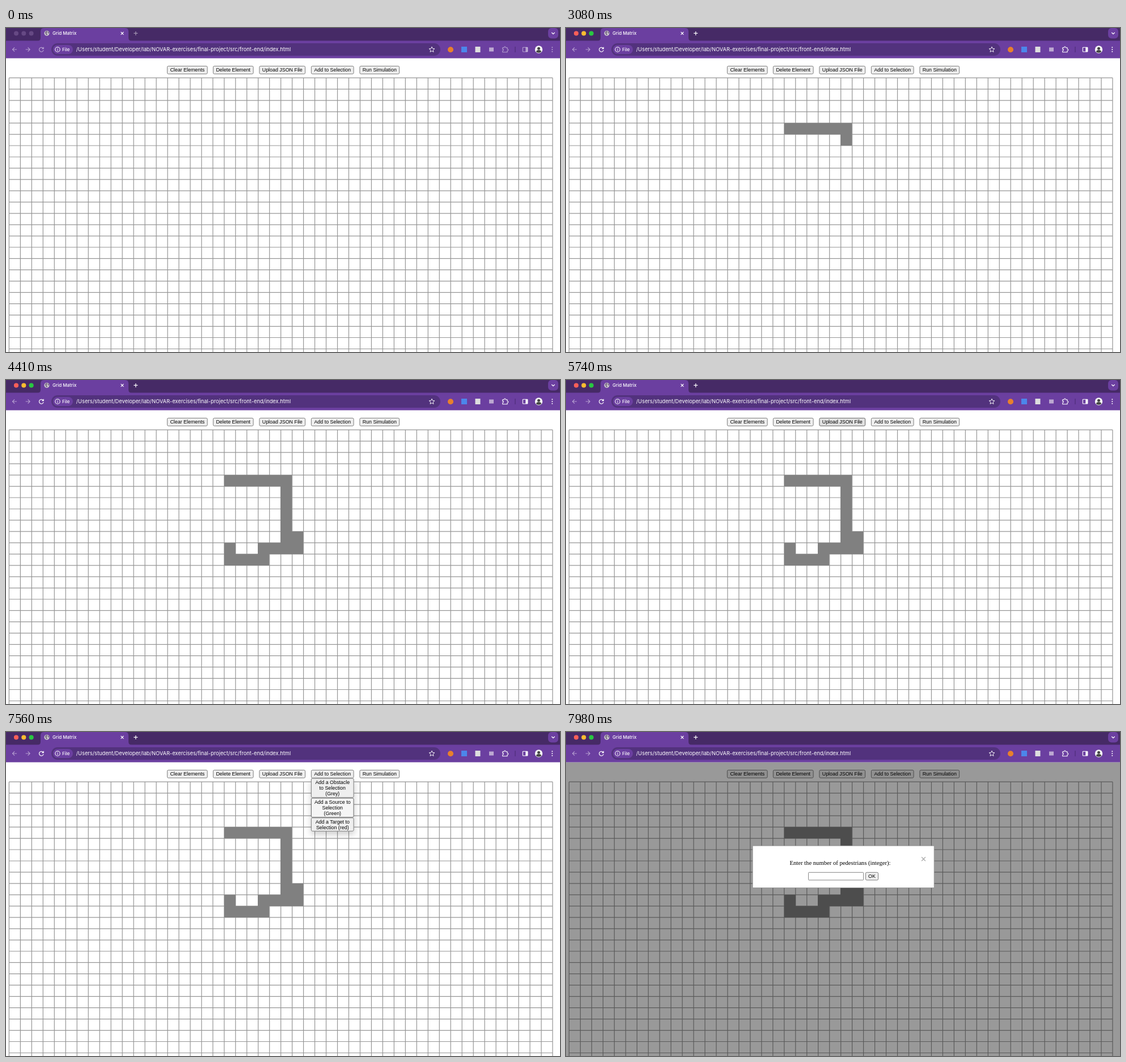
Write an HTML page with a canvas that moves like this. It is 977 px wide and 573 px high and loops after 8 s.

```html
<!DOCTYPE html>
<html lang="en">
<head>
<meta charset="utf-8">
<title>Grid Matrix</title>
<style>
html, body { margin: 0; width: 100%; height: 100%; overflow: hidden; background: #fff; }
canvas { display: block; }
</style>
</head>
<body>
<canvas id="stage" width="977" height="573"></canvas>
<script>
const ctx = document.getElementById('stage').getContext('2d');
const LOOP = 8000, PITCH = 19.97, LEFT = 5.4, TOP = 88.2;
const UI = 'Inter, sans-serif', ARIAL = '"Liberation Sans", Arial, sans-serif', TIMES = '"Liberation Serif", Times, serif';
const STRIP = '#462a66', BAR = '#6b3fa0', PILL = '#52327d';

// [time, column, row] of each painted cell
const cells = [
  [2310, 19, 4], [2520, 20, 4], [2590, 21, 4], [2660, 22, 4], [2730, 23, 4], [2730, 24, 4],
  [3080, 24, 5], [3150, 24, 6], [3290, 24, 7], [3360, 24, 8], [3430, 24, 9], [3500, 25, 9],
  [3570, 25, 10], [3920, 24, 10], [4060, 23, 10], [4060, 22, 10], [4130, 22, 11],
  [4200, 21, 11], [4200, 20, 11], [4340, 19, 11], [4410, 19, 10]
];

// [start, end, button, pressed]
const pointer = [
  [5740, 6090, 'Upload JSON File'],
  [6300, 6440, 'Add to Selection'], [6440, 6580, 'Add to Selection', true], [6580, 6790, 'Add to Selection'],
  [6790, 6930, 'Obstacle'], [6930, 7210, 'Source'],
  [7420, 7490, 'Target'], [7490, 7560, 'Source'], [7560, 7840, 'Source', true]
];

const buttons = [
  ['Clear Elements', 284, 71.5], ['Delete Element', 365, 71.5], ['Upload JSON File', 446.5, 81.5],
  ['Add to Selection', 538, 75.5], ['Run Simulation', 623.5, 70.5]
];

const menu = [
  ['Obstacle', 81.7, 34.6, ['Add a Obstacle', 'to Selection', '(Grey)']],
  ['Source', 116.6, 34.6, ['Add a Source to', 'Selection', '(Green)']],
  ['Target', 151.5, 24.2, ['Add a Target to', 'Selection (red)']]
];

function box(x, y, w, h, r, fill, stroke, width = 0.9) {
  ctx.beginPath();
  ctx.roundRect(x, y, w, h, r);
  if (fill) { ctx.fillStyle = fill; ctx.fill(); }
  if (stroke) { ctx.strokeStyle = stroke; ctx.lineWidth = width; ctx.stroke(); }
}

function disc(x, y, r, fill) {
  ctx.beginPath();
  ctx.arc(x, y, r, 0, 7);
  ctx.fillStyle = fill;
  ctx.fill();
}

function stroke(d, color = '#fff', width = 1.1) {
  ctx.strokeStyle = color;
  ctx.lineWidth = width;
  ctx.stroke(new Path2D(d));
}

function text(str, x, y, font, color = '#000', align = 'left') {
  ctx.font = font;
  ctx.fillStyle = color;
  ctx.textAlign = align;
  ctx.fillText(str, x, y);
}

function button(id, x, y, w, h, lines, t) {
  const hit = pointer.find(p => t >= p[0] && t < p[1] && p[2] === id);
  const fill = !hit ? '#efefef' : hit[3] ? '#f5f5f5' : '#e2e2e2';
  box(x + 0.4, y + 0.4, w - 0.8, h - 0.8, 2, fill, hit ? '#555' : '#707070');
  lines.forEach((line, i) => text(line, x + w / 2, y + 10.1 + i * 10.3, '8.88px ' + ARIAL, '#000', 'center'));
}

function browser(focus) {
  const dim = 0.5 + 0.5 * focus;
  box(0, 0, 977, 23, 0, STRIP);
  box(0, 22.5, 977, 31, 0, BAR);
  ctx.fillStyle = BAR;
  ctx.fill(new Path2D('M55 23q6 0 6-6V6q0-6 6-6H210q6 0 6 6V17q0 6 6 6z'));

  ['#ff5f57', '#febc2e', '#28c840'].forEach((color, i) => {
    const x = 18 + 13.3 * i;
    disc(x, 9.5, 4, '#664984');
    ctx.globalAlpha = focus;
    disc(x, 9.5, 4, color);
    ctx.globalAlpha = 1;
  });

  disc(72, 9.3, 4.6, '#c9c5ce');
  ctx.fillStyle = '#74667f';
  ctx.fill(new Path2D('M69 7l3-2 1 2-2 2 2 2-1 2-2-2zM73.5 6l2 1 .5 3-2-1z'));
  text('Grid Matrix', 82, 12.1, '500 8px ' + UI, '#fff');
  stroke('M202.6 7l4.8 4.8m0-4.8l-4.8 4.8');
  box(956, 0, 18, 18.5, 6, BAR);
  stroke('M962.3 8l2.7 2.7 2.7-2.7', '#fff', 1.3);

  box(80, 27, 686, 22, 11, PILL);
  box(83, 30, 35, 16, 8, BAR);
  stroke('M95.2 38a4.2 4.2 0 1 1-8.4 0a4.2 4.2 0 1 1 8.4 0M91 37.4v2.8M91 35.5v1.1');
  text('File', 99, 41, '500 8px ' + UI, '#fff');
  text('/Users/student/Developer/lab/NOVAR-exercises/final-project/src/front-end/index.html',
    123.7, 41.3, '9.3px ' + UI, '#fff');
  stroke('M751 33.2l1.4 3.2 3.5.3-2.7 2.3.8 3.4-3-1.8-3 1.8.8-3.4-2.7-2.3 3.5-.3z', '#fff', 0.9);
  stroke('M19 38H11.5m3.6-3.6L11.5 38l3.6 3.6M34.7 38h7.5m-3.6-3.6L42.2 38l-3.6 3.6', '#b7a0d2');

  disc(784, 38.3, 5, '#e8802c');
  box(803, 33, 10, 10, 0, '#4c86ea');
  box(827.5, 33, 9, 10, 0, '#dedede');
  box(852, 34.5, 8, 7, 0, '#bca8d1');
  box(897.5, 33, 1, 10, 0, '#4a2b70');
  disc(939.5, 38, 6.7, '#f6f6f6');
  disc(939.5, 36.2, 2.5, '#444');
  ctx.fill(new Path2D('M935 42.2q0-3.2 4.5-3.2t4.5 3.2q-4.5 3-9 0z'));

  ctx.globalAlpha = dim;
  stroke('M225.3 9.4h7m-3.5-3.5v7', '#fff', 1.2);
  stroke('M65.6 36A3.9 3.9 0 1 0 66.2 39M66.2 33.8V36.6H63.4', '#fff', 1.2);
  stroke('M875.8 34.8h2.6q0-2 1.4-2t1.4 2h2.8v2.5q1.8 0 1.8 1.5t-1.8 1.5v2.4h-8.2v-2.5q1.6-.2 1.6-1.4t-1.6-1.4z');
  box(911.3, 34.2, 8.6, 7.8, 0.8, null, '#fff', 1.1);
  box(916.3, 34.2, 3.6, 7.8, 0, '#fff');
  [34.3, 38, 41.7].forEach(y => disc(963.3, y, 1, '#fff'));
  ctx.globalAlpha = 1;
}

function grid(t) {
  let lines = '';
  for (let i = 0; i <= 48; i++) lines += `M${LEFT + i * PITCH} ${TOP}V573`;
  for (let j = 0; j <= 24; j++) lines += `M${LEFT} ${TOP + j * PITCH}H${LEFT + 48 * PITCH}`;
  stroke(lines, '#959595', 1.2);
  for (const [start, col, row] of cells) {
    if (t >= start) box(Math.round(LEFT + col * PITCH - 0.3), Math.round(TOP + row * PITCH - 0.3), 20, 20, 0, '#808080');
  }
}

function dropdown(t) {
  ctx.save();
  ctx.shadowColor = 'rgba(0,0,0,.2)';
  ctx.shadowBlur = 10.7;
  ctx.shadowOffsetY = 5.3;
  box(538, 81.7, 75.5, 94, 0, '#f1f1f1');
  ctx.restore();
  for (const [id, y, h, lines] of menu) button(id, 538, y, 75.5, h, lines, t);
}

function dialog(t) {
  box(0, 53.5, 977, 520, 0, 'rgba(0,0,0,.4)');
  box(329.2, 201.2, 320, 74.3, 0, '#fff', '#888', 0.7);
  text('×', 630.5, 231, 'bold 18.6px ' + TIMES, '#aaa', 'center');
  text('Enter the number of pedestrians (integer):', 394.4, 234.7, '10.65px ' + TIMES);
  box(427.6, 248.3, 97, 13.6, 1, '#fff', '#767676');
  button('OK', 528, 247.9, 23, 14.4, ['OK'], t);
}

function draw(t) {
  box(0, 0, 977, 573, 0, '#fff');
  grid(t);
  for (const [label, x, w] of buttons) button(label, x, 67, w, 14.6, [label], t);
  if (t >= 6580 && t < 7910) dropdown(t);
  if (t >= 7840) dialog(t);
  browser(t < 1120 ? 0 : t < 1190 ? 0.5 : 1);
}

function tick(now) {
  draw(now % LOOP);
  requestAnimationFrame(tick);
}
requestAnimationFrame(tick);
</script>
</body>
</html>
```
